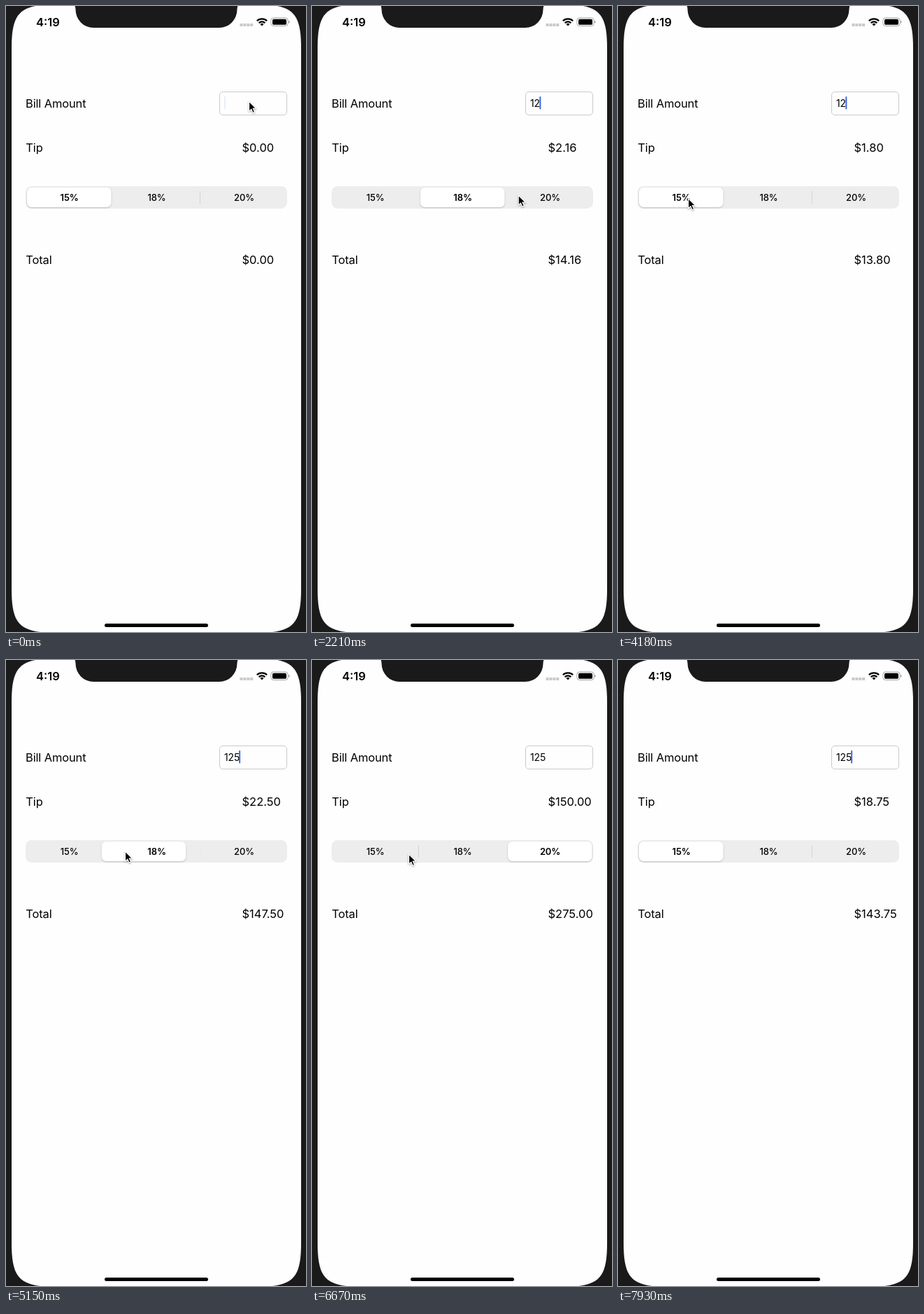
An HTML page for the animation above (8020 ms loop, 429 by 893 pixels).

```html
<!DOCTYPE html>
<html lang="en">
<head>
<meta charset="utf-8">
<title>Tip calculator</title>
<style>
  html, body { margin: 0; width: 100%; height: 100%; overflow: hidden; background: #1a1a1a; }
  svg { display: block; width: 429px; height: 893px; font-family: Inter, "Liberation Sans", sans-serif; }
  .body { font-size: 16.5px; letter-spacing: -.15px; }
  .sum { letter-spacing: 0; }
  .seg { font-size: 13px; letter-spacing: -.1px; text-anchor: middle; }
  #thumb { filter: drop-shadow(0 1px 1.2px rgba(0, 0, 0, .2)); }
  #mouse { filter: drop-shadow(0 1px 1px rgba(0, 0, 0, .35)); }
</style>
</head>
<body>
<svg viewBox="0 0 429 893">
  <rect width="429" height="893" fill="#1a1a1a"/>
  <path id="screen" fill="#fefefe"/>
  <path d="M98-1Q99.500 1 99.500 5A25.500 26 0 0 0 125 31H305A25.500 26 0 0 0 330.500 5Q330.500 1 332-1Z" fill="#1a1a1a"/>

  <text x="43" y="28.500" font-size="16.500" font-weight="600">4:19</text>
  <path d="M334.500 27H354" stroke="#c9c9cb" stroke-width="4" stroke-dasharray="4 .9"/>
  <g fill="none" stroke="#000" stroke-width="2.200">
    <path d="M358.800 21.300a10.200 10.200 0 0 1 14.400 0"/>
    <path d="M361.600 24.300a6.200 6.200 0 0 1 8.800 0"/>
  </g>
  <path d="M366 28.500l-2.500-2.600a3.600 3.600 0 0 1 5 0z"/>
  <rect x="379" y="17" width="24" height="11.500" rx="3.300" fill="none" stroke="#a4a4a4"/>
  <rect x="381" y="18.700" width="20" height="8.100" rx="1.900"/>
  <path d="M404 20.800q1.600.5 1.600 2t-1.600 2z" fill="#a4a4a4"/>

  <g class="body">
    <text x="28" y="144.700">Bill Amount</text>
    <text x="28.300" y="207.700">Tip</text>
    <text x="28.300" y="367.700">Total</text>
    <text id="tip" class="sum" x="337.500" y="207.700"></text>
    <text id="total" class="sum" x="337.500" y="367.700"></text>
  </g>

  <rect x="305.500" y="122.500" width="96" height="33" rx="4.500" fill="#fefefe" stroke="#cbcbcb"/>
  <text id="bill" x="312" y="143.800" font-size="14" letter-spacing="-.1"></text>
  <rect id="caret" y="129" width="2" height="18.500" rx="1" fill="#3e66ea"/>

  <rect x="28" y="257" width="374" height="32" rx="8.500" fill="#ededed"/>
  <rect class="line" x="152" y="264" width="1" height="18" fill="#d3d3d5"/>
  <rect class="line" x="277" y="264" width="1" height="18" fill="#d3d3d5"/>
  <rect id="thumb" y="259" width="120.500" height="28" rx="6.500" fill="#fff"/>
  <text class="seg" x="90.600" y="277.600">15%</text>
  <text class="seg" x="215.600" y="277.600">18%</text>
  <text class="seg" x="340.600" y="277.600">20%</text>

  <rect x="141" y="881" width="148" height="5" rx="2.500"/>
  <path id="mouse" d="M0 0V14.200L3.300 11.200L5.500 16.200L8 15.100L5.900 10.200H10.200Z" stroke="#fff" stroke-width="1.200"/>
</svg>
<script>
const LOOP = 8020, STEP = LOOP / 90, GLIDE = 360;
const RATES = [.15, .18, 1.2];

const BILL = "125";
const keys = [530, 800, 4530];

const taps = [
  { at: -LOOP, seg: 0 },
  { at: 1336, seg: 1 },
  { at: 2390, seg: 2 },
  { at: 2983, seg: 0 },
  { at: 4968, seg: 1 },
  { at: 5790, seg: 2 },
  { at: 6755, seg: 0 }
];

// every move of the pointer takes the same time
const moves = [
  { at: -LOOP, x: 347.5, y: 136 },
  { at: 790, x: 236.5, y: 270 },
  { at: 2029, x: 338, y: 270 },
  { at: 2495, x: 100.5, y: 274.5 },
  { at: 4350, x: 170.5, y: 273 },
  { at: 5300, x: 336, y: 272 },
  { at: 6210, x: 138.5, y: 277 },
  { at: 7030, x: 362, y: 690 },
  { at: 7400, x: 383, y: 915 }
];

const $ = id => document.getElementById(id);
const lines = document.querySelectorAll(".line");
const labels = document.querySelectorAll(".seg");
const clamp = v => Math.max(0, Math.min(1, v));
const mix = (a, b, p) => a + (b - a) * p;
const smooth = p => p * p * (3 - 2 * p);
const money = v => "$" + v.toFixed(2);
const typed = t => BILL.slice(0, keys.filter(k => k <= t).length);

// the latest entry and the one before it
function latest(list, t) {
  const n = list.filter(item => item.at <= t).length - 1;
  return [list[n], list[Math.max(0, n - 1)]];
}

function spring(ms) {
  const k = ms * .017;
  return ms > 440 ? 1 : 1 - (1 + k) * Math.exp(-k);
}

// solid after a key, then one blink per second
function caretAlpha(t) {
  const count = typed(t).length;
  const since = t - keys[count - 1];
  if (since < 800) return 1;
  const c = count ? (since + 740) % 1000 : t + 740;
  return clamp(c / 120) * (1 - clamp((c - 580) / 180));
}

// screen outline with continuous corners
function outline(x, y, w, h) {
  const far = 62, near = 11.8, a = far - near;
  return `M${x + far} ${y}h${w - 2 * far}c${a} 0 ${far} ${near} ${far} ${far}` +
    `v${h - 2 * far}c0 ${a} ${-near} ${far} ${-far} ${far}`.replace(`${-near} ${far} ${-far}`, `${-near} ${far} ${-far}`) +
    `h${2 * far - w}c${-a} 0 ${-far} ${-near} ${-far} ${-far}` +
    `v${2 * far - h}c0 ${-a} ${near} ${-far} ${far} ${-far}z`;
}

function draw(t) {
  const [tap, before] = latest(taps, t);
  const seg = tap.seg, from = before.seg;
  const p = spring(t - tap.at);
  const share = i => mix(+(from === i), +(seg === i), p);

  $("thumb").setAttribute("x", 30 + 125 * mix(from, seg, p));
  labels.forEach((label, i) => label.style.fontWeight = Math.round(500 + 100 * p * (seg === i)));
  lines.forEach((line, i) => line.style.opacity = clamp(1 - share(i) - share(i + 1)));

  const bill = Number(typed(tap.at));
  const tip = bill * RATES[seg];
  $("tip").textContent = money(tip);
  $("total").textContent = money(bill + tip);

  $("bill").textContent = typed(t);
  $("caret").setAttribute("x", 312 + $("bill").getComputedTextLength() * .95);
  $("caret").style.opacity = caretAlpha(t);

  const [to, start] = latest(moves, t);
  const q = smooth(clamp((t - to.at) / GLIDE));
  $("mouse").setAttribute("transform", `translate(${mix(start.x, to.x, q)} ${mix(start.y, to.y, q)})`);
}

function tick() {
  const t = performance.now() % LOOP;
  draw(Math.floor(t / STEP + .25) % 90 * STEP);
  requestAnimationFrame(tick);
}

// corner curves run from the edge at "far" with handles at "near"
$("screen").setAttribute("d", outline(8, -2, 414, 896));
tick();
</script>
</body>
</html>
```
